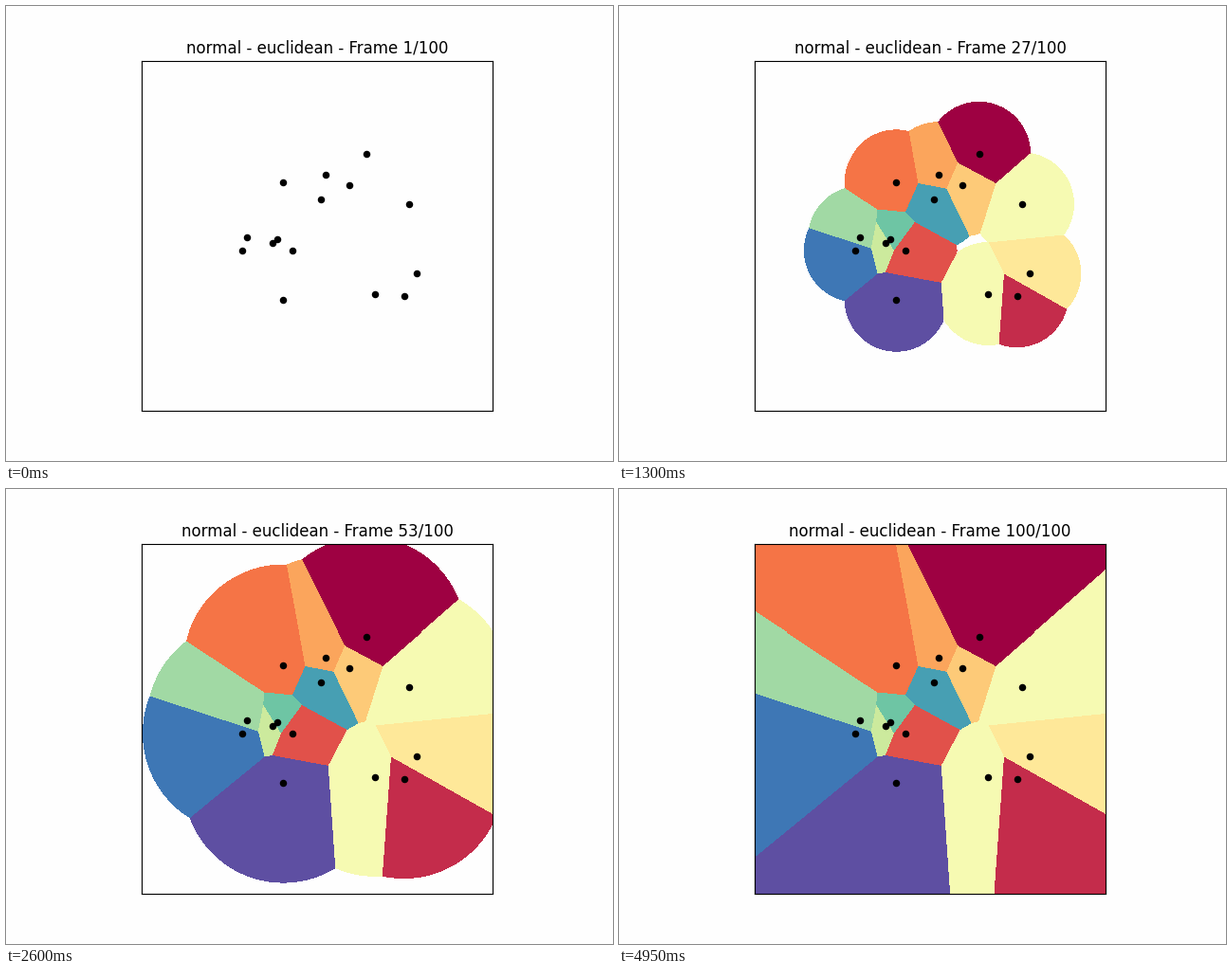
A matplotlib script that plays this animation: 640x480 px, repeating every 5000 ms.

```python
import numpy as np
import matplotlib.pyplot as plt
from matplotlib.animation import FuncAnimation

FRAMES = 100
INTERVAL = 50
PAPER = "#fefefe"
START_RADIUS, GROWTH = 3.65, 1.956

# Seed points in stage pixels, in colour order
SEEDS = np.array([
    (379.5, 156.4), (419.5, 305.7), (302.0, 257.8), (292.3, 185.9),
    (336.8, 177.7), (362.0, 188.8), (432.8, 282.1), (425.4, 208.9),
    (389.3, 303.5), (281.2, 249.6), (253.8, 244.3), (286.4, 246.4),
    (331.8, 203.5), (249.4, 257.8), (292.3, 310.2),
])

# One cell per screen pixel
LEFT, RIGHT, TOP, BOTTOM = 143, 513, 57, 428
gx, gy = np.meshgrid(np.arange(LEFT, RIGHT) + 0.5, np.arange(TOP, BOTTOM) + 0.5)
dists = np.hypot(gx[..., None] - SEEDS[:, 0], gy[..., None] - SEEDS[:, 1])
owner = dists.argmin(axis=2)
nearest = dists.min(axis=2)

palette = plt.get_cmap("Spectral")(np.linspace(0, 1, len(SEEDS)))
palette[7:9] = np.array([246, 250, 178, 255]) / 255  # the two middle cells match
cells = palette[owner]

plt.rcParams["font.family"] = "DejaVu Sans"
fig, ax = plt.subplots(figsize=(6.4, 4.8), dpi=100, facecolor=PAPER)
ax.set_facecolor(PAPER)
image = ax.imshow(cells, extent=(LEFT, RIGHT, BOTTOM, TOP), interpolation="nearest")
ax.plot(*SEEDS.T, "ko", markersize=4.4, markeredgewidth=1)
ax.set(xlim=(143.2, 512.8), ylim=(427.2, 57.6), xticks=[], yticks=[])
title = ax.set_title("")


def update(n):
    radius = START_RADIUS + GROWTH * n if n else 0
    rgba = cells.copy()
    rgba[nearest > radius, 3] = 0
    image.set_data(rgba)
    title.set_text(f"normal - euclidean - Frame {n + 1}/{FRAMES}")
    return image, title


anim = FuncAnimation(fig, update, frames=FRAMES, interval=INTERVAL,
                     repeat=True, repeat_delay=0)
plt.show()
```
